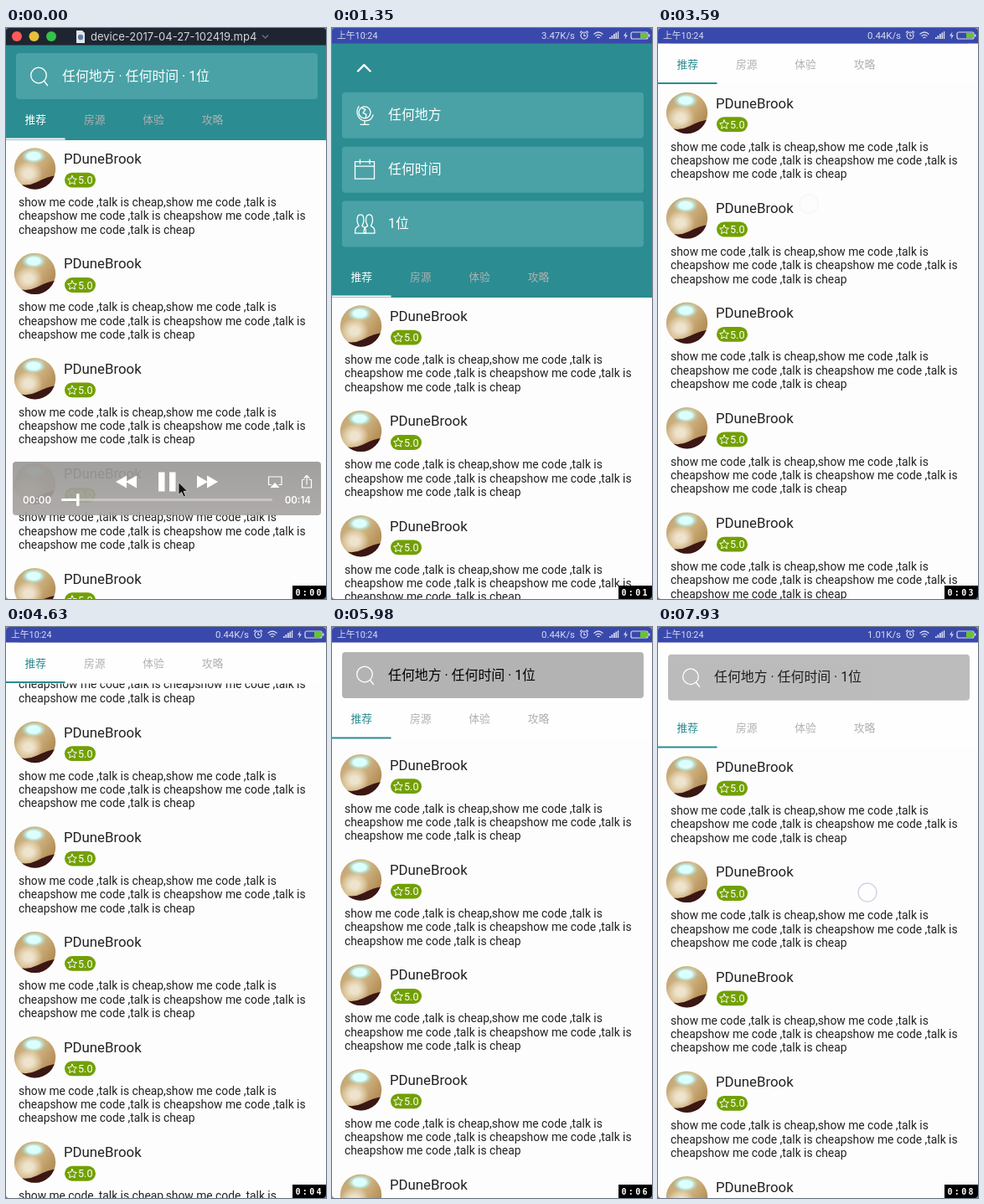
An HTML page for the animation above (8000 ms loop, 382x682 px).

```html
<!DOCTYPE html>
<html lang="zh-CN">
<head>
<meta charset="utf-8">
<title>Collapsing search header</title>
<style>
html, body { margin: 0; width: 100%; height: 100%; overflow: hidden; background: #8a8a8a; }
svg { display: block; }
#stage { width: 382px; height: 682px; border-radius: 4px; background: #fdfdfd; }
text { font-family: Roboto, "Noto Sans CJK SC", "Noto Sans CJK", sans-serif; white-space: pre; }
.name { font-size: 16.8px; fill: #222; }
.body { font-size: 13.84px; fill: #222; }
.rate { font-size: 12.6px; fill: #fff; }
.field { font-size: 15.9px; fill: var(--fg); }
.tab { font-size: 12.75px; fill: #b0b0b0; text-anchor: middle; }
.tab.on { fill: var(--on); }
.status text { font-size: 10.8px; fill: #d9dcf0; }
.line { fill: none; stroke: #fff; stroke-width: 1.3; stroke-linecap: round; stroke-linejoin: round; }
.thin { fill: none; stroke: #d9dcf0; stroke-width: 1.2; }
.box { fill: var(--box); }
.mac { font-family: Inter, sans-serif; }
.clock { font: bold 10px "DejaVu Sans Mono", monospace; letter-spacing: 2.3px; fill: #fff; }
</style>
</head>
<body>
<svg id="stage" viewBox="0 0 382 682">
  <defs>
    <linearGradient id="photo" x2="1" y2=".6">
      <stop offset="0" stop-color="#b89a68"/>
      <stop offset=".5" stop-color="#d8bd8c"/>
      <stop offset="1" stop-color="#b08a52"/>
    </linearGradient>
    <radialGradient id="cream">
      <stop offset=".3" stop-color="#eee3cc"/>
      <stop offset="1" stop-color="#eee3cc" stop-opacity="0"/>
    </radialGradient>
    <radialGradient id="glow">
      <stop offset=".5" stop-color="#dcffff"/>
      <stop offset="1" stop-color="#7fe6e6" stop-opacity="0"/>
    </radialGradient>
    <linearGradient id="panel" x2="0" y2="1">
      <stop offset="0" stop-color="#9a9896"/>
      <stop offset="1" stop-color="#a7a4a2"/>
    </linearGradient>
    <clipPath id="round"><circle cx="34.5" cy="34" r="24.7"/></clipPath>
    <g id="item">
      <g clip-path="url(#round)">
        <rect x="9" y="9" width="51" height="50" fill="url(#photo)"/>
        <ellipse cx="27" cy="40" rx="17" ry="15" fill="url(#cream)"/>
        <path d="M9 50q14 7 28 0t24-8v20h-52z" fill="#3a1614"/>
        <ellipse cx="33" cy="19" rx="15" ry="9" fill="url(#glow)"/>
      </g>
      <text class="name" x="69" y="28">PDuneBrook</text>
      <rect x="70" y="38.7" width="37" height="17.8" rx="8.900" fill="#72a003"/>
      <path class="line" d="M79 42.400l1.600 3.500 3.800.400-2.800 2.600.800 3.800-3.400-1.900-3.400 1.900.800-3.800-2.800-2.600 3.800-.400z" style="stroke-width:1"/>
      <text class="rate" x="86" y="52.3">5.0</text>
      <text class="body" x="15" y="79">show me code ,talk is cheap,show me code ,talk is</text>
      <text class="body" x="15" y="95.35">cheapshow me code ,talk is cheapshow me code ,talk is</text>
      <text class="body" x="15" y="111.7">cheapshow me code ,talk is cheap</text>
    </g>
    <path id="person" d="M27.500 38.500c0-5.500 1-7.500 4.500-8.500 0-2-2-3-2-7 0-9 8-9 8 0 0 4-2 5-2 7 3.500 1 4.500 3 4.500 8.500z"/>
  </defs>

  <g id="list"></g>

  <g id="header">
    <rect id="back" width="382" height="134" fill="var(--bg)"/>
    <g id="search">
      <rect class="box" x="12" y="30" width="360" height="55" rx="4"/>
      <circle class="line" cx="39" cy="56.5" r="9.3"/>
      <path class="line" d="M45.5 63.5l4 5"/>
      <text class="field" x="67" y="62.5">任何地方 · 任何时间 · 1位</text>
    </g>
    <g id="fields">
      <path class="line" d="M31 51.5l7.3-7.3 7.3 7.3" style="stroke-width:2.4"/>
      <g class="row">
        <rect class="box" x="12" width="360" height="55" rx="4"/>
        <circle class="line" cx="39" cy="24" r="7"/>
        <path class="line" d="M35 18.500l5 2-3 4 4 2-1 4M32 17c-5 7 0 17 8 17 5 0 8-3 9-7M39 34v4.500M34 38.500h10"/>
        <text class="field" x="67" y="32.3">任何地方</text>
      </g>
      <g class="row">
        <rect class="box" x="12" width="360" height="55" rx="4"/>
        <path class="line" d="M27.500 18h23v20.500h-23zM27.500 23.500h23M33.500 15.500v5M45 15.500v5"/>
        <text class="field" x="67" y="32.3">任何时间</text>
      </g>
      <g class="row">
        <rect class="box" x="12" width="360" height="55" rx="4"/>
        <use href="#person" class="line"/>
        <use href="#person" class="line" x="10.500"/>
        <text class="field" x="67" y="32.3">1位</text>
      </g>
    </g>
    <g id="tabs">
      <text class="tab on" x="35.3" y="114.3">推荐</text>
      <text class="tab" x="105.7" y="114.3">房源</text>
      <text class="tab" x="176.1" y="114.3">体验</text>
      <text class="tab" x="246.5" y="114.3">攻略</text>
      <rect y="131.5" width="70.5" height="2" fill="var(--on)"/>
    </g>
  </g>

  <g class="status">
    <rect width="382" height="18.5" fill="#3949ab"/>
    <text x="6" y="13">上午10:24</text>
    <text id="speed" x="290" y="13" text-anchor="end" style="font-size:11.4px"></text>
    <circle class="thin" cx="301" cy="9" r="4"/>
    <path class="thin" d="M301 6.5v3h2M296 5.5l2.5-2M306 5.5l-2.5-2M312.5 7.5q5.5-5 11 0M314.5 9.7q3.5-3 7 0M316.5 11.7q1.5-1 3 0"/>
    <path d="M331 13v-2h1.7v2zM333.5 13v-4h1.7v4zM336 13v-6h1.7v6zM338.5 13v-7.5h1.7v7.5zM341 13v-9h1.2v9zM351.5 4.5l-3.5 5h2.5l-1 4 3.5-5h-2.5z" fill="#d9dcf0"/>
    <rect class="thin" x="357" y="5" width="20" height="8" rx="2"/>
    <rect x="368" y="6" width="8.5" height="6" fill="#66c52e"/>
    <rect x="378" y="7.5" width="1.5" height="3" fill="#d9dcf0"/>
  </g>

  <circle id="touch" r="11" fill="#fff" fill-opacity=".5" stroke="#d2d5e6" stroke-width="1.4"/>

  <g id="player">
    <rect width="382" height="20.5" fill="#1e2530"/>
    <circle cx="13" cy="10" r="6" fill="#fc5b57"/>
    <circle cx="33.5" cy="10" r="6" fill="#e5bf3c"/>
    <circle cx="54" cy="10" r="6" fill="#35c14a"/>
    <path d="M84 3h7l3 3v12h-10z" fill="#e4e6ea"/>
    <circle cx="89" cy="11" r="3.2" fill="#5f7fb0"/>
    <text class="mac" x="101" y="14.7" font-size="13" fill="#d2d5d9">device-2017-04-27-102419.mp4</text>
    <path d="M306 8.5l3.5 3.5 3.5-3.5" fill="none" stroke="#6d737c" stroke-width="1.3"/>
    <rect x="8" y="518" width="368" height="64" rx="4" fill="url(#panel)" opacity=".92"/>
    <g fill="#fff">
      <path d="M144 534.5v15l-13-7.5zM156 534.5v15l-13-7.5zM228 534.5v15l13-7.5zM240 534.5v15l13-7.5zM182 530.5h7.5v23h-7.5zM195 530.5h7.5v23h-7.5z"/>
      <rect x="66" y="562" width="252" height="3" rx="1.5" opacity=".35"/>
      <rect x="66" y="562" width="20" height="3" rx="1.5"/>
      <rect x="84" y="556" width="3.5" height="15" rx="1.5"/>
      <path d="M321 543l5.5 6h-11z"/>
      <text class="mac" x="20" y="567.5" font-size="11.5" font-weight="600">00:00</text>
      <text class="mac" x="364" y="567.5" text-anchor="end" font-size="11.5" font-weight="600">00:14</text>
    </g>
    <path class="line" d="M316.5 545.5h-3v-9.5h15.5v9.5h-3M356 539.5h-2.5v9.5h11v-9.5h-2.5M359 545v-10M356 537.5l3-3 3 3" style="stroke-width:1.2"/>
    <path d="M206 542.5v15l3.5-3.2 2.6 5.7 2.4-1-2.5-5.7h4.7z" fill="#111" stroke="#ddd" stroke-width=".8"/>
  </g>

  <rect x="342" y="666" width="40" height="16" fill="#000"/>
  <text id="clock" class="clock" x="345.5" y="677.5"></text>
</svg>
<script>
const LOOP = 8000, PITCH = 125.4, GROW = 188;
const $ = id => document.getElementById(id);
const clamp = v => Math.min(1, Math.max(0, v));
const smooth = v => (v = clamp(v), v * v * (3 - 2 * v));
const mix = (a, b, k) => `rgb(${a.map((v, i) => Math.round(v + (b[i] - v) * k))})`;
const shift = (el, y) => el.setAttribute('transform', `translate(0 ${y.toFixed(2)})`);

// Eased value along [time, value] stops.
function track(stops, t) {
  const i = stops.findIndex(s => s[0] > t);
  if (i < 0) return stops[stops.length - 1][1];
  if (!i) return stops[0][1];
  const [t0, a] = stops[i - 1], [t1, b] = stops[i];
  return a + (b - a) * smooth((t - t0) / (t1 - t0));
}

const expand = [[900, 0], [1300, 1], [1890, 1], [2290, 0], [7800, 0], [7930, .0585]];
const hide = [[2650, 0], [3480, 66.5], [5390, 66.5], [5750, 0]];
const scroll = [[3650, 0], [3950, 60], [4100, 60], [5080, 335.8], [5600, 335.8],
  [5980, 242.2], [6350, 200], [7480, 0]];
const whiten = [[2750, 0], [3350, 1]];
const overlay = [[180, 1], [650, 0]];

// start, end, from x, y, to x, y
const touches = [
  [2650, 3610, 200, 290, 180, 210],
  [3850, 4550, 200, 430, 190, 230],
  [5300, 5850, 214, 242, 225, 400],
  [6250, 6900, 225, 230, 240, 400],
  [7810, 8200, 250, 317, 250, 317]
];

const TEAL = [43, 140, 145], WHITE = [255, 255, 255];
const stage = $('stage'), rows = document.querySelectorAll('.row');

for (let i = 0; i < 6; i++) {
  const use = document.createElementNS(stage.namespaceURI, 'use');
  use.setAttribute('href', '#item');
  use.setAttribute('y', i * PITCH);
  $('list').append(use);
}

function paint(w) {
  const vars = {
    bg: mix(TEAL, [254, 254, 254], w),
    box: mix([74, 162, 166], [179, 179, 179], w),
    fg: mix(WHITE, [0, 0, 0], w),
    on: mix(WHITE, TEAL, w)
  };
  for (const k in vars) stage.style.setProperty('--' + k, vars[k]);
}

function drawTouch(t) {
  const hit = touches.find(([a, b]) => t >= a && t < b);
  $('touch').style.opacity = hit ? Math.min(clamp((t - hit[0]) / 60), clamp((hit[1] - t) / 120)) : 0;
  if (!hit) return;
  const [a, b, x0, y0, x1, y1] = hit, k = smooth((t - a - 80) / (b - a - 80));
  $('touch').setAttribute('cx', x0 + (x1 - x0) * k);
  $('touch').setAttribute('cy', y0 + (y1 - y0) * k);
}

function draw(t) {
  const p = track(expand, t), off = track(hide, t);
  const height = 134 + GROW * p;
  paint(track(whiten, t));
  shift($('list'), height - off - track(scroll, t) % PITCH);
  shift($('header'), -off);
  $('back').setAttribute('height', height);
  shift($('search'), 47 * p);
  $('search').style.opacity = clamp(1 - 2 * p);
  $('fields').style.opacity = clamp(2 * p - 1);
  rows.forEach((row, i) => shift(row, 30 + (46.8 + 64.9 * i) * p));
  shift($('tabs'), GROW * p);
  drawTouch(t);
  $('player').style.opacity = track(overlay, t);
  $('speed').textContent = (t < 1650 ? '3.47' : t < 6580 ? '0.44' : '1.01') + 'K/s';
  $('clock').textContent = '0:0' + Math.floor((t + 75) / 1000);
}

let start;
function tick(now) {
  start ??= now;
  draw((now - start) % LOOP);
  requestAnimationFrame(tick);
}
draw(0);
requestAnimationFrame(tick);
</script>
</body>
</html>
```
